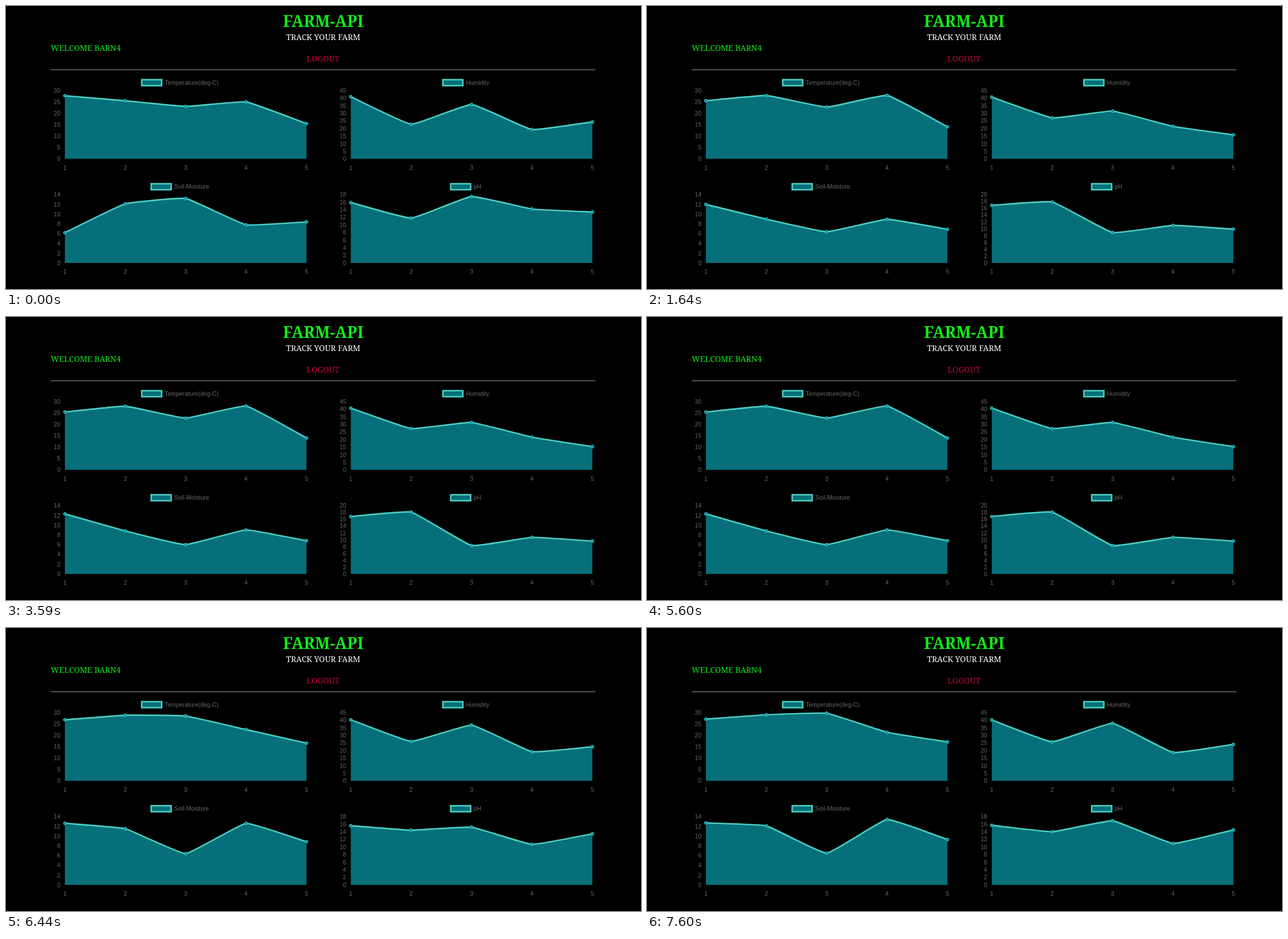
Recreate the animation shown at these times as an HTML page. Size 1121 by 499 pixels, loop 8 s.

```html
<!DOCTYPE html>
<html lang="en">
<head>
<meta charset="utf-8">
<title>Farm dashboard</title>
<style>
  html, body { margin: 0; width: 100%; height: 100%; overflow: hidden; background: #000; }
  svg { display: block; width: 1121px; height: 499px; }
  .head { font: 14.08px "Noto Serif", serif; }
  .head .title { font-size: 28.15px; font-weight: bold; }
  .mid { text-anchor: middle; }
  .end { text-anchor: end; }
  #charts { font: 10.55px "Liberation Sans", Arial, sans-serif; fill: #666; }
  .area, .key { fill: #066f79; }
  .line, .key { stroke: #4acfc2; stroke-width: 2.64; }
  .line { fill: none; stroke-linejoin: round; }
  .dot { fill: #17909a; stroke: #35cbd2; }
</style>
</head>
<body>
<svg viewBox="0 0 1121 499">
  <g class="head">
    <text class="title mid" x="560" y="37" fill="#10ec14">FARM-API</text>
    <text class="mid" x="560" y="60" fill="#fff">TRACK YOUR FARM</text>
    <text x="79" y="79" fill="#10ec14">WELCOME BARN4</text>
    <text class="mid" x="559.8" y="98" fill="#c8003c">LOGOUT</text>
  </g>
  <path d="M79 112.5H1040.5" stroke="#999"/>
  <g id="charts"></g>
</svg>
<script>
const LOOP = 8000, DURATION = 1000;
const AXIS_CHANGES = [1040, 6092], TWEENS = [1120, 6092];
const WIDTH = 426.4, HEIGHT = 120.5, TENSION = 0.1, KEY = 35.2, KEY_GAP = 5.4;

// Three successive batches of sensor readings per chart.
const sensors = {
  'Temperature(deg-C)': [[27.7, 25.5, 23, 25, 15.5], [25.4, 27.9, 22.7, 28, 14], [27.1, 29, 29.7, 21.3, 17.1]],
  'Humidity': [[40.9, 22.8, 35.8, 19.3, 24.3], [40.6, 27.2, 31.2, 21.5, 15.3], [40.1, 25.7, 37.9, 18.7, 24]],
  'Soil-Moisture': [[6.2, 12.1, 13.2, 7.8, 8.4], [12.3, 8.8, 6, 9, 6.8], [12.7, 12.1, 6.5, 13.4, 9.3]],
  'pH': [[15.9, 11.8, 17.5, 14.2, 13.4], [16.8, 18.1, 8.3, 10.7, 9.6], [15.7, 14, 16.9, 10.9, 14.5]]
};

const stage = document.getElementById('charts');
const pen = document.createElement('canvas').getContext('2d');
pen.font = getComputedStyle(stage).font;

const clamp = (v, lo, hi) => Math.min(hi, Math.max(lo, v));
const easeOutQuart = p => 1 - (1 - p) ** 4;
const text = (x, y, s, cls = '') => `<text class="${cls}" x="${x}" y="${y}">${s}</text>`;

// Axis that starts at zero and ends on the first tick above the highest reading.
function axis(values) {
  const max = Math.max(...values), step = max > 20 ? 5 : 2;
  return { step, limit: Math.ceil(max / step) * step };
}

// Cardinal spline whose handles stay inside the plot.
function curve(points, top) {
  const handles = points.map(([x, y], i) => {
    const [px, py] = points[i - 1] || [x, y];
    const [nx, ny] = points[i + 1] || [x, y];
    const before = Math.hypot(x - px, y - py), after = Math.hypot(nx - x, ny - y);
    const at = k => [x + k * (nx - px), clamp(y + k * (ny - py), top, top + HEIGHT)];
    const k = TENSION / (before + after);
    return { enter: at(-k * before), leave: at(k * after) };
  });
  return 'M' + points[0] + points.slice(1).map((p, i) =>
    `C${handles[i].leave} ${handles[i + 1].enter} ${p}`).join('');
}

function drawChart([name, batches], index, t) {
  const x = 104 + index % 2 * 504.7, top = 149 + (index >> 1) * 183.5, bottom = top + HEIGHT;
  const [a, b] = TWEENS.map(s => easeOutQuart(clamp((t - s) / DURATION, 0, 1)));
  const [first, second, third] = batches.map(batch =>
    batch.map(v => bottom - v / axis(batch).limit * HEIGHT));
  const points = first.map((y, i) => [x + i * WIDTH / 4,
    y + (second[i] - y) * a + (third[i] - second[i]) * b]);
  const path = curve(points, top);
  const { step, limit } = axis(batches[AXIS_CHANGES.filter(s => t >= s).length]);

  const keyX = x + 203.4 - (KEY + KEY_GAP + pen.measureText(name).width) / 2;
  let out = `<rect class="key" x="${keyX}" y="${top - 19.1}" width="${KEY}" height="10.55"/>`;
  out += text(keyX + KEY + KEY_GAP, top - 10.2, name);
  for (let v = 0; v <= limit; v += step)
    out += text(x - 8, bottom - v / limit * HEIGHT + 3.8, v, 'end');
  out += `<path class="area" d="${path}V${bottom}H${x}Z"/><path class="line" d="${path}"/>`;
  points.forEach(([px, py], i) => {
    out += `<circle class="dot" cx="${px}" cy="${py}" r="2.64"/>`;
    out += text(px, bottom + 19, i + 1, 'mid');
  });
  return out;
}

const start = performance.now();
function frame() {
  const t = (performance.now() - start) % LOOP;
  stage.innerHTML = Object.entries(sensors).map((s, i) => drawChart(s, i, t)).join('');
  requestAnimationFrame(frame);
}
frame();
</script>
</body>
</html>
```
